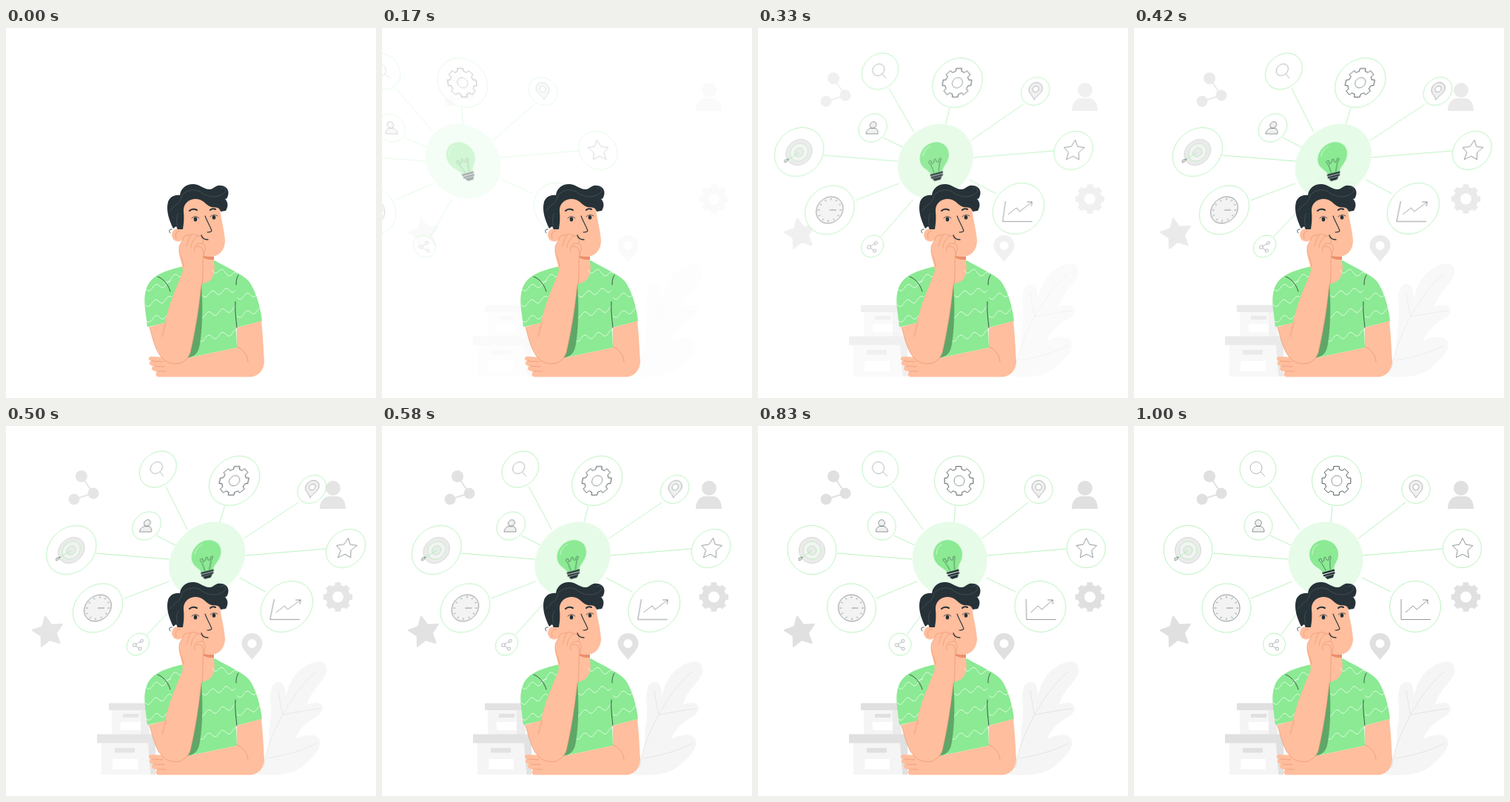
An HTML page for the animation above (1.04 s loop, 500 by 500 pixels).

```html
<!DOCTYPE html>
<html lang="en">
<head>
<meta charset="utf-8">
<title>Thinking of ideas</title>
<style>
  html, body { margin: 0; width: 100%; height: 100%; overflow: hidden; background: #fff; }
  svg { display: block; width: 100vw; height: 100vh; }
  #ideas { transform-origin: 250px 172px; }
  .ink { fill: none; stroke: #263238; stroke-width: .8; stroke-linecap: round; stroke-linejoin: round; }
  .thin { fill: none; stroke: #263238; stroke-width: .5; stroke-linejoin: round; }
  .faint { fill: none; stroke: #263238; stroke-width: .35; stroke-linejoin: round; }
  .green { fill: none; stroke: #8bea93; stroke-width: .6; }
  .fold { fill: none; stroke: #e58f6d; stroke-width: .6; stroke-linecap: round; stroke-linejoin: round; }
  .wave { fill: none; stroke: #fff; stroke-width: .7; }
  .skin { fill: #ffbe9d; }
  .hair { fill: #263238; }
</style>
</head>
<body>
<svg viewBox="0 0 500 500">
  <defs>
    <path id="shirt" d="M240 322C222 326 205 331 196 341C188 350 186 363 188 380L191 404L217 398L230 454L245 446L312 432L311 405L346 396C344 378 338 355 328 342C319 332 300 325 282 314L266 330Z"/>
    <clipPath id="cloth"><use href="#shirt"/></clipPath>
  </defs>

  <g id="scenery" fill="#e0e0e0">
    <path d="M102 68L118 91L92 99" fill="none" stroke="#e0e0e0" stroke-width="2"/>
    <circle cx="102" cy="68" r="8"/><circle cx="118" cy="91" r="7.5"/><circle cx="92" cy="99" r="7.5"/>
    <circle cx="442" cy="84" r="10"/>
    <path d="M424 112C424 101 430 95 437 95H447C454 95 459 101 459 112Z"/>
    <path id="bigGear" fill-rule="evenodd"/>
    <path fill-rule="evenodd" d="M332.500 316C326 307 318.500 302 318.500 294A14 14 0 0 1 346.500 294C346.500 302 339 307 332.500 316ZM338.500 294A6 6 0 1 0 326.500 294A6 6 0 1 0 338.500 294Z"/>
    <path id="bigStar" stroke="#e0e0e0" stroke-width="2" stroke-linejoin="round"/>

    <g>
      <rect x="143" y="384" width="50" height="33" fill="#f5f5f5"/>
      <rect x="182" y="384" width="12" height="33" fill="#ebebeb"/>
      <rect x="139" y="374.500" width="55" height="9.500"/>
      <rect x="158" y="389" width="21" height="5"/>
      <rect x="155" y="400" width="27" height="11" fill="#fff"/>
      <rect x="129" y="428" width="65" height="43" fill="#f5f5f5"/>
      <path d="M192 428H202V471H195Z"/>
      <rect x="123" y="416.500" width="79" height="12"/>
      <rect x="147" y="435" width="27" height="6.500"/>
      <rect x="144" y="450" width="34" height="14" fill="#fff"/>
    </g>

    <path fill="#f5f5f5" d="M338 470C349 455 354 440 355 424C355 405 359 396 358 377C356 362 358 347 367 346C377 345 377 354 378 365C382 350 388 335 402 326C415 317 431 315 433 326C435 339 422 349 416 358C410 366 407 374 406 377C416 372 428 373 428 382C427 391 414 395 407 401C399 408 393 416 391 423C403 417 421 414 424 425C427 438 411 450 402 459C391 469 364 475 338 470Z"/>
    <path fill="none" stroke="#e0e0e0" stroke-width=".8" d="M348 462C353 432 361 416 372 393C386 368 402 346 419 332M374 390C371 378 369 365 368 357M374 390C391 387 408 384 424 382M354 449C375 445 399 440 419 429"/>
  </g>

  <g id="ideas">
    <path class="green" d="M268 108L266 130M183 82L224 140M367 103L303 152M184 148L212 161M107 172L208 180M417 166L309 175M158 233L214 210M347 224L308 205M199 282L236 232"/>
    <circle cx="259" cy="180" r="50.500" fill="#e6fbe8"/>
    <g id="rings" class="green"></g>

    <path id="gearIcon" class="ink"/>
    <circle cx="274" cy="74" r="7" class="thin"/>
    <g class="faint"><circle cx="165" cy="56.500" r="8"/><path d="M171 62L177 68"/></g>
    <g class="faint">
      <path fill="#f0f0f0" d="M381 97C378 91 372 88 372 82.500A9 9 0 0 1 390 82.500C390 88 384 91 381 97Z"/>
      <circle cx="381" cy="82.500" r="4" fill="#fff"/>
    </g>
    <g class="thin">
      <path d="M160 143C160 138 163 135.500 166 135.500H170C173 135.500 176 138 176 143Z" fill="#f0f0f0"/>
      <circle cx="168" cy="131" r="4.300" fill="#f0f0f0"/>
    </g>
    <g>
      <circle cx="73" cy="168" r="17.500" fill="#ebebeb" stroke="#aaa" stroke-width=".4"/>
      <circle cx="73" cy="168" r="12" fill="#f3f3f3" stroke="#8bea93" stroke-width=".5"/>
      <circle cx="73" cy="168" r="6" fill="#ebebeb" stroke="#8bea93" stroke-width=".6"/>
      <path class="green" d="M73 168L56 180"/>
      <path class="thin" d="M60 177L55 178.500V181.500L58 181Z"/>
    </g>
    <path id="starIcon" class="thin"/>
    <g class="thin">
      <circle cx="125" cy="246" r="18" fill="#f3f3f3"/>
      <path id="ticks"/>
      <path d="M125 246H134"/>
    </g>
    <path class="thin" d="M361 234V261.500H401M367 252L377 243L382 248L397 235M390 235H397V241"/>
    <g class="faint"><path d="M185 296L193 291M185 296L193 301"/><circle cx="185" cy="296" r="2.300" fill="#fff"/><circle cx="193.500" cy="290.500" r="2" fill="#fff"/><circle cx="193.500" cy="301" r="2" fill="#fff"/></g>

    <g transform="translate(256.500 173.500) rotate(-15)">
      <path fill="#8bea93" d="M-8 23.500C-8 19-13 16-16.500 10.500A19.500 19.500 0 1 1 16.500 10.500C13 16 8 19 8 23.500Z"/>
      <path class="thin" d="M-3 22L-6 10C-10 6-8 3-5 5C-4 8-6 9-4 9C0 9-2 4 0 4C3 4 0 9 4 9C6 9 4 7 6 5C9 3 9 7 6 10L3 22"/>
      <path fill="none" stroke="#e6fbe8" stroke-width=".7" stroke-linecap="round" d="M-15-4C-13-11-9-14-4-15"/>
      <path class="hair" d="M-8.500 23H8.500V25.500H-8.500ZM-8 26.500H8V29H-8ZM-6.500 29.500H6.500L4 33.500H-4Z"/>
    </g>
  </g>

  <g id="man">
    <use href="#shirt" fill="#8bea93"/>
    <path class="skin" d="M262 300L281 305V316C283 326 282 335 276 341C271 345 266 346 262 345Z"/>
    <path fill="#eb8f6c" d="M262 307L281 309V313C273 314 267 311 262 307Z"/>
    <g id="waves" class="wave" clip-path="url(#cloth)"></g>
    <path fill="#5ea768" d="M264 346C266 372 266 402 262 427C260 437 258 443 245 446C254 425 258 385 264 346Z"/>
    <path class="ink" d="M205 336C213 339 219 346 222 356M314 334C311 339 311 343 311 347M310 370C309 382 311 394 312 405"/>

    <path class="skin" d="M312 405L345 396C347 413 348 434 349 450C349 461 342 471.500 329 471.500H206C201 471 202 465 205 464C197 465 194 458 200 457C194 457 191 451 197 450C192 450 191 444 197 444C210 444 222 447 236 448L312 432Z"/>
    <path class="fold" d="M312 431C321 434 326 442 327 451M197 450L212 451M200 457L214 457.500M204 464L216 464"/>
    <path class="skin" d="M194 404L215 398C219 376 230 352 239 329L266 320L264 346C261 379 255 414 249 439C245 450 235 456 224 453C207 450 201 432 194 404Z"/>
    <path class="fold" d="M264 346C261 379 255 414 249 439C245 450 235 456 224 453C207 450 201 432 194 404M216 398L211 417"/>

    <path class="skin" d="M235 238C247 226 277 229 289 244C291 260 295 273 296 287C296 300 288 309 276 309C260 309 242 299 238 284Z"/>
    <path class="skin" d="M237 272C232 268 224 273 224 280C225 288 232 291 240 286Z"/>
    <path class="fold" d="M235 275C230 274 228 279 230 285"/>
    <path class="ink" d="M224 272C220 272 220 274 222 277"/>
    <path class="hair" d="M226 271C220 259 216 246 219 235C221 229 227 225 235 226C236 216 245 210 254 211C264 212 268 219 276 218C282 217 283 212 290 213C299 213 303 221 299 229C299 230 297 231 296 231C301 236 300 242 297 247L290 248C288 241 283 243 278 242C270 240 267 231 257 231C246 231 239 238 240 249C241 257 240 266 239 272L232 272L230 268Z"/>
    <path fill="none" stroke="#59666b" stroke-width=".5" d="M222 247C226 239 237 238 238 226C243 219 255 217 262 221C275 231 289 229 296 222C299 217 293 213 290 218M233 250C229 256 231 263 232 268"/>
    <path class="ink" style="stroke-width:2" d="M248 247C251 244 254 244 258 246M276 246C278 244 281 244 283 245"/>
    <path class="ink" d="M251 257C254 254 258 254 261 257M276 255C279 252 283 252 286 254"/>
    <ellipse cx="256" cy="258.500" rx="2.300" ry="3" class="hair"/><ellipse cx="281" cy="256" rx="2.300" ry="2.800" class="hair"/>
    <path class="ink" style="stroke-width:1.100" d="M269 254C272 262 276 268 278 274C277 276 275 276 272 276"/>
    <path class="ink" style="stroke-width:1.300" d="M264 280C265 284 268 286 273 286"/>

    <path class="skin" d="M239 333C240 321 233 309 234 299C234 291 238 290 240 283C242 279 247 281 250 279C254 277 256 281 259 280C265 281 267 288 266 291C271 295 269 302 267 307C265 316 267 330 265 347L244 352Z"/>
    <path class="fold" d="M240 322C240 313 233 307 234 299C234 291 238 290 240 283C242 279 247 281 250 279C254 277 256 281 259 280C265 281 267 288 266 291C271 295 269 302 267 307C265 316 267 330 265 347M250 280C246 286 245 291 244 295M259 281C252 286 250 292 250 297M266 291C258 290 253 295 255 302M257 296C262 293 267 296 267 307"/>
  </g>
</svg>
<script>
const $ = id => document.getElementById(id);
const polar = (cx, cy, r, a) => `${(cx + r * Math.cos(a)).toFixed(2)} ${(cy + r * Math.sin(a)).toFixed(2)}`;

function star(cx, cy, r, tilt = 0) {
  const pts = Array.from({ length: 10 }, (_, i) =>
    polar(cx, cy, i % 2 ? r * .5 : r, i * Math.PI / 5 - Math.PI / 2 + tilt));
  return `M${pts.join('L')}Z`;
}

function gear(cx, cy, outer, inner) {
  const pts = [];
  for (let i = 0; i < 8; i++) {
    const a = i * Math.PI / 4;
    for (const [r, d] of [[inner, -.25], [outer, -.19], [outer, .19], [inner, .25]]) pts.push(polar(cx, cy, r, a + d));
  }
  return `M${pts.join('L')}Z`;
}

function wave(x0, y0, x1, y1) {
  const n = Math.round(x1 - x0);
  const pts = Array.from({ length: n + 1 }, (_, i) =>
    `${x0 + i} ${(y0 + (y1 - y0) * i / n + 3.4 * Math.sin(i * .34)).toFixed(2)}`);
  return `<path d="M${pts.join('L')}"/>`;
}

$('gearIcon').setAttribute('d', gear(273.5, 74, 19.7, 16));
$('bigGear').setAttribute('d', gear(448.5, 231, 20, 16.5) + 'M456 231A7.5 7.5 0 1 0 441 231A7.5 7.5 0 1 0 456 231Z');
$('starIcon').setAttribute('d', star(444, 166, 14.5));
$('bigStar').setAttribute('d', star(57, 278.5, 21.5, -.19));
$('ticks').setAttribute('d', Array.from({ length: 12 }, (_, i) =>
  `M${polar(125, 246, 13.5, i * Math.PI / 6)}L${polar(125, 246, 16, i * Math.PI / 6)}`).join(''));

$('rings').innerHTML = [
  [274, 74, 33.5], [167.5, 58.5, 24.5], [381, 85.5, 19], [168, 135, 19], [73, 167.5, 33],
  [443.5, 165.5, 26], [125, 246, 33], [380, 244, 34.5], [189.5, 295, 15]
].map(([x, y, r]) => `<circle cx="${x}" cy="${y}" r="${r}" fill="#fff"/>`).join('');

$('waves').innerHTML = [
  [189, 353, 223, 345], [188, 374, 224, 365], [189, 395, 221, 388], [214, 342, 242, 331],
  [278, 327, 313, 334], [265, 361, 310, 353], [260, 390, 310, 379], [260, 421, 311, 411],
  [312, 364, 340, 359], [312, 389, 346, 380]
].map(w => wave(...w)).join('');

const easing = 'cubic-bezier(.36,-.01,.5,1.38)';
const pose = (offset, skew, x, opacity) =>
  ({ offset, transform: `matrix(1,0,${skew},1,${x},0)`, opacity, easing });
const timing = { duration: 1000, fill: 'both' };
const moves = [
  $('ideas').animate([pose(0, .364, -250, 0), pose(.6, -.1763, 0, 1), pose(.8, .0349, 0, 1), pose(1, 0, 0, 1)], timing),
  $('scenery').animate([{ opacity: 0, easing }, { opacity: 1 }], timing)
];
moves.forEach(m => m.pause());

// 24 steps a second; the entrance is already 35 ms old when the loop begins.
const LOOP = 1040, LEAD = 35, STEP = 1000 / 24;
const start = performance.now();
function draw() {
  const t = (performance.now() - start) % LOOP;
  const step = Math.min(24, Math.floor((t + 5) / (LOOP / 25)));
  const at = Math.min(1000, step * STEP + LEAD);
  moves.forEach(m => { m.currentTime = at; });
  requestAnimationFrame(draw);
}
draw();
</script>
</body>
</html>
```
